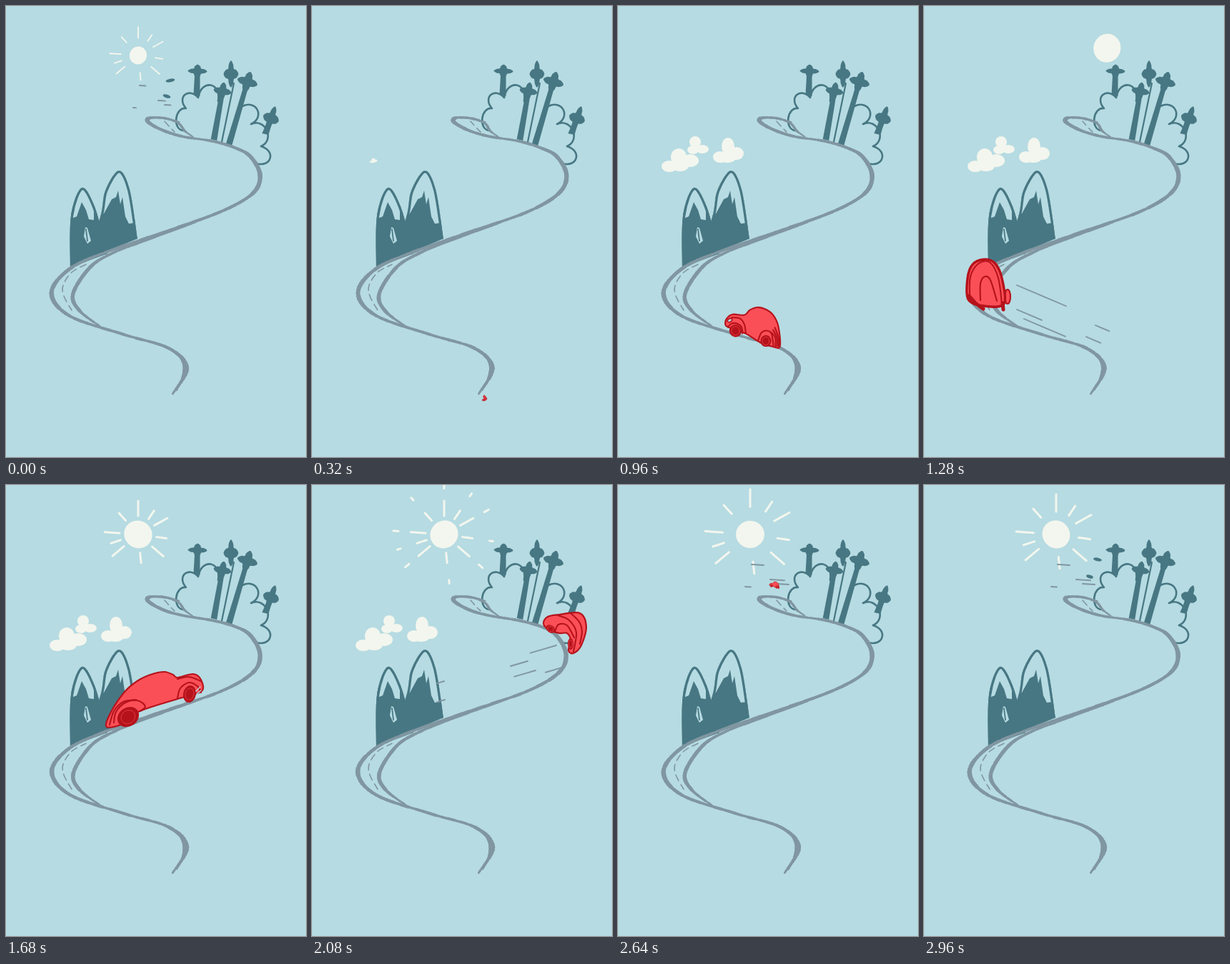
Animation, 420 px wide and 630 px high, one loop 3.04 s. Source, as an HTML page with a canvas:

```html
<!DOCTYPE html>
<html lang="en">
<head>
<meta charset="utf-8">
<title>Road trip</title>
<style>
html, body { margin: 0; width: 100%; height: 100%; overflow: hidden; background: #b6dbe2; }
canvas { display: block; }
</style>
</head>
<body>
<canvas id="stage" width="420" height="630"></canvas>
<script>
const ctx = document.getElementById('stage').getContext('2d');
const STEP = 80, COUNT = 38;
const SKY = '#b6dbe2', TEAL = '#477783', GRAY = '#8096a1', CREAM = '#f3f6ee', RED = '#fb4f57', DARK = '#b5121b';
const lerp = (a, b, k) => a + (b - a) * k;
const clamp = v => Math.max(0, Math.min(1, v));

function random(seed) {
  return () => {
    seed = (seed * 16807 + 11) % 2147483647;
    return seed / 2147483647 - 0.5;
  };
}

// smooth path through a flat list of points
function trace(p, closed) {
  const n = p.length / 2;
  const pick = k => {
    const m = closed ? (k + n) % n : Math.max(0, Math.min(n - 1, k));
    return [p[2 * m], p[2 * m + 1]];
  };
  ctx.beginPath();
  ctx.moveTo(p[0], p[1]);
  for (let k = 0; k < (closed ? n : n - 1); k++) {
    const [a, b, c, d] = [pick(k - 1), pick(k), pick(k + 1), pick(k + 2)];
    ctx.bezierCurveTo(b[0] + (c[0] - a[0]) / 6, b[1] + (c[1] - a[1]) / 6,
      c[0] - (d[0] - b[0]) / 6, c[1] - (d[1] - b[1]) / 6, c[0], c[1]);
  }
  if (closed) ctx.closePath();
}

function fill(color) {
  ctx.fillStyle = color;
  ctx.fill();
}

function stroke(color, width) {
  ctx.strokeStyle = color;
  ctx.lineWidth = width;
  ctx.stroke();
}

function line(color, width, p, closed) {
  trace(p, closed);
  stroke(color, width);
}

function poly(color, p) {
  ctx.beginPath();
  for (let n = 0; n < p.length; n += 2) ctx.lineTo(p[n], p[n + 1]);
  fill(color);
}

function oval(x, y, rx, ry = rx, turn = 0) {
  ctx.beginPath();
  ctx.ellipse(x, y, rx, ry, turn, 0, 7);
}

// brush stroke, heavier where the path runs up and down
function brush(p, size, rnd) {
  const q = p.map(v => v + rnd() * 0.9), n = q.length / 2;
  const spline = (k, m, t) => {
    const [a, b, c, d] = [-1, 0, 1, 2].map(o => q[2 * Math.max(0, Math.min(n - 1, k + o)) + m]);
    return b + 0.5 * t * (c - a + t * (2 * a - 5 * b + 4 * c - d + t * (3 * (b - c) + d - a)));
  };
  let x = q[0], y = q[1];
  for (let s = 1; s <= 8 * (n - 1); s++) {
    const k = Math.floor((s - 1) / 8), t = s / 8 - k;
    const u = spline(k, 0, t), v = spline(k, 1, t);
    const steep = Math.abs(v - y) / Math.hypot(u - x, v - y);
    const taper = Math.min(1, 0.5 + s / 16, 0.5 + (8 * (n - 1) - s) / 16);
    ctx.beginPath();
    ctx.moveTo(x, y);
    ctx.lineTo(u, v);
    stroke(GRAY, size * taper * (2.9 + 3.2 * steep + rnd()));
    [x, y] = [u, v];
  }
}

const OUTER = [
  243, 162, 222, 157, 203, 156, 198, 160, 206, 167, 225, 176, 250, 183, 290, 189, 320, 198, 342, 210, 356, 236,
  345, 262, 300, 288, 220, 316, 140, 344, 88, 368, 64, 401, 90, 433, 165, 459, 228, 478, 253, 506, 233, 542
];
const INNER = [265, 302, 190, 329, 150, 345, 118, 365, 94, 402, 103, 426, 132, 448];
const SPUR = [231, 480, 242, 488, 249, 503, 247, 521, 239, 537];
const FAR = [232, 160, 243, 165, 250, 175, 262, 183];

function road(i) {
  const kind = i > 35 ? 0 : Math.floor((i - (i > 27 ? 2 : 0)) / 2) % 3;
  const rnd = random(4211 + kind * 977);
  brush(OUTER, 1, rnd);
  brush(INNER, 0.9, rnd);
  brush(SPUR, 0.5, rnd);
  brush(FAR, 0.6, rnd);
  ctx.setLineDash([9, 6]);
  ctx.lineDashOffset = kind;
  line(GRAY, 1.6, [112, 361, 92, 372, 80, 390, 81, 405, 92, 425]);
  line(GRAY, 1.6, [222, 161, 230, 170, 236, 176]);
  ctx.setLineDash([]);
}

// a hill with snow above a jagged edge
function peak(outline, edge) {
  ctx.save();
  trace(outline);
  fill(TEAL);
  ctx.clip();
  poly(SKY, [edge[0], 220, ...edge, edge[edge.length - 2], 220]);
  line(TEAL, 6.5, outline);
  ctx.restore();
}

function mountains() {
  peak([90, 365, 91, 293, 106, 254, 124, 280, 142, 346], [94, 296, 99, 294, 106, 274, 112, 285, 116, 298, 123, 299]);
  peak([110, 356, 132, 295, 139, 258, 158, 230, 173, 256, 184, 325],
    [130, 293, 137, 290, 148, 270, 154, 267, 157, 258, 160, 277, 163, 267, 167, 294, 172, 304, 180, 303]);
  poly(SKY, [111, 309, 109, 322, 114, 332, 119, 328, 114, 310]);
  line(TEAL, 1.8, [112, 312, 114, 328]);
}

// outward bumps between points [x, y, bulge of the bump that ends here]
function scallop(points) {
  ctx.beginPath();
  ctx.moveTo(points[0][0], points[0][1]);
  for (let k = 1; k < points.length; k++) {
    const [x, y] = points[k - 1], [u, v, bulge] = points[k];
    const nx = (v - y) * bulge, ny = (x - u) * bulge;
    ctx.bezierCurveTo(x + nx, y + ny, u + nx, v + ny, u, v);
  }
  stroke(TEAL, 2.6);
}

// trunk from foot to top and a four-lobed crown
function tree(x, y, u, v, width, rx, ry) {
  const half = width / 2, lean = Math.atan2(u - x, y - v);
  if (width) poly(TEAL, [x - half, y - 1, x + half, y + 1, u + half * 0.8, v, u - half * 0.8, v]);
  const p = [];
  for (let a = 0; a < 6.28; a += Math.PI / 8) {
    const r = 0.8 + 0.24 * Math.cos(4 * a);
    const s = Math.cos(a) * r * rx, t = Math.sin(a) * r * ry;
    p.push(u + s * Math.cos(lean) - t * Math.sin(lean), v + s * Math.sin(lean) + t * Math.cos(lean));
  }
  trace(p, true);
  fill(TEAL);
}

function grove() {
  scallop([[248, 174], [252, 143, 0.5], [269, 128, 0.9], [297, 133, 0.95]]);
  scallop([[331, 140], [343, 165, 0.8], [357, 196, 0.65], [350, 220, 0.9]]);
  line(TEAL, 2.2, [302, 190, 319, 108]);
  tree(267, 125, 268, 91, 9, 13, 9);
  tree(291, 187, 303, 119, 8.5, 12, 12);
  tree(315, 110, 315, 95, 0, 10, 18);
  tree(312, 194, 338, 106, 8.5, 14, 14);
  tree(363, 179, 371, 157, 9, 11, 17);
}

const RAYS = [-90, -56, -29, 8, 41, 84, 140, 162, 184, 228];

// one burst of rays: the tips ease out, the roots catch up
function burst(age) {
  if (age > 6) return;
  const near = 21 + 4.5 * age + 0.45 * age * age;
  const tip = 71 - 36 * (1 - age / 6) ** 2;
  RAYS.forEach((deg, n) => {
    const a = deg * Math.PI / 180, far = lerp(near, tip, n % 2 ? 0.7 : 1.04);
    line(CREAM, 3, [Math.cos(a) * near, Math.sin(a) * near, Math.cos(a) * far, Math.sin(a) * far]);
  });
}

function sun(j) {
  const size = 1 - 0.37 * Math.max(0, j - 37);
  if (j < 14 || size <= 0) return;
  const k = clamp((j - 14) / 6), left = 1 - k;
  ctx.save();
  ctx.translate(lerp(292, 185, k), 69 + 19 * left * left - 84 * k * left);
  ctx.scale(size, size);
  oval(0, 0, 19, 20, j);
  fill(CREAM);
  if (j >= 20) burst((j - 20) % 5);
  if (j >= 25) burst((j - 20) % 5 + 5);
  ctx.restore();
}

const CLOUDS = [
  { x: 86, y: 216, born: 3.5, gone: 32.5, puffs: [[72, 224, 11, 8], [85, 211, 11, 12], [101, 216, 12, 9], [87, 223, 12, 8]] },
  { x: 111, y: 195, born: 4, gone: 31.7, puffs: [[108, 190, 8, 8], [118, 200, 9, 6], [105, 201, 8, 6]] },
  { x: 156, y: 205, born: 5, gone: 30.2, puffs: [[154, 196, 9, 12], [143, 211, 10, 8], [166, 206, 10, 9], [153, 212, 12, 7]] }
];

function clouds(j) {
  CLOUDS.forEach(({ x, y, born, gone, puffs }) => {
    const size = clamp((j - born) / 2.5) * clamp((gone - j) / 3);
    puffs.forEach(([px, py, rx, ry]) => {
      oval(lerp(x, px, size), lerp(y, py, size), rx * size, ry * size);
      fill(CREAM);
    });
  });
}

function body(w, p) {
  trace(p, true);
  fill(RED);
  stroke(DARK, w);
}

function wheel(w, x, y, rx, ry, turn = 0) {
  oval(x, y, rx, ry, turn);
  fill(DARK);
  oval(x, y, rx * 0.65, ry * 0.7, turn);
  stroke(RED, w * 0.3);
}

// each pose is drawn in place, around its own middle
const POSES = {
  left: { x: 291, y: 155, draw(w) {
    body(w, [222, 153, 225, 138, 238, 128, 266, 127, 278, 114, 296, 106, 316, 109, 335, 121, 350, 147, 358, 195,
      340, 197, 310, 190, 272, 171, 231, 160]);
    wheel(w, 248, 167, 15, 15);
    wheel(w, 323, 185, 13, 14);
    line(DARK, w, [229, 160, 236, 151, 250, 149, 262, 157, 265, 172]);
    line(DARK, w, [236, 136, 255, 136, 268, 150, 273, 170]);
    line(DARK, w, [304, 187, 310, 167, 322, 160, 335, 166, 342, 194]);
    for (let n = 0; n < 3; n++) line(DARK, w, [334 + n * 4, 163 - n * 6, 345 + n * 4, 175, 347 + n * 4, 195]);
    oval(232, 143, 6, 4, -0.6);
    fill(SKY);
    stroke(DARK, w * 0.8);
  } },
  right: { x: 208, y: 300, draw(w) {
    body(w, [141, 338, 146, 319, 166, 289, 185, 273, 205, 264, 222, 261, 234, 265, 240, 269, 262, 264, 273, 272,
      274, 288, 243, 298, 187, 316, 165, 333]);
    wheel(w, 171, 324, 16, 13, -0.6);
    wheel(w, 257, 292, 9, 12, 0.2);
    line(DARK, w, [151, 332, 154, 317, 167, 304, 184, 301, 195, 309, 188, 316]);
    line(DARK, w, [145, 335, 151, 316, 164, 303, 182, 300]);
    line(DARK, w, [240, 298, 244, 284, 256, 276, 268, 281, 273, 290]);
    line(DARK, w, [240, 271, 256, 268, 273, 274]);
    for (let n = 0; n < 2; n++) line(SKY, w * 0.6, [266 + n, 288 + n * 4, 272 + n, 282 + n * 5]);
  } },
  rear: { x: 88, y: 390, draw(w) {
    oval(117, 406, 4, 10);
    fill(RED);
    stroke(DARK, w);
    body(w * 1.6, [62, 410, 61, 380, 68, 361, 84, 354, 99, 359, 109, 380, 112, 416, 84, 419]);
    line(DARK, w, [64, 404, 65, 378, 76, 360, 92, 358, 104, 380, 109, 416]);
    line(DARK, w, [79, 411, 79, 388, 85, 378, 93, 383, 102, 412]);
    line(DARK, w * 2.4, [63, 405, 72, 415, 83, 423]);
    line(DARK, w * 2.4, [110, 415, 111, 424]);
  } },
  bend: { x: 355, y: 205, draw(w) {
    body(w, [324, 193, 330, 184, 346, 181, 375, 179, 384, 198, 377, 224, 366, 235, 359, 231, 362, 217, 357, 207, 346, 207, 331, 202]);
    line(DARK, w, [344, 182, 360, 189, 370, 206, 366, 233]);
    line(DARK, w, [362, 179, 374, 191, 378, 205, 375, 222]);
    line(DARK, w, [340, 205, 345, 195, 357, 196, 367, 213]);
    wheel(w, 334, 201, 7, 5, 0.6);
    wheel(w, 362, 222, 4, 8);
  } }
};

// speed, spin and growth are per step, counted from the moment mid
const LEGS = [
  { pose: 'bend', first: 4, last: 8, mid: 8, x: 269, y: 532, dx: 7, dy: -4, turn: 63, size: 0.72, grow: 0.15 },
  { pose: 'left', first: 9, last: 14, mid: 12, x: 190, y: 449, dx: -26, dy: -13, turn: 5, spin: -3, size: 0.58, grow: 0.075 },
  { pose: 'rear', first: 15, last: 17, mid: 16, dx: -4, dy: -16 },
  { pose: 'right', first: 18, last: 24, mid: 21, dx: 33, dy: -14, fade: 0.035 },
  { pose: 'bend', first: 25, last: 27, mid: 26, dx: -1, dy: -18, spin: -20 },
  { pose: 'left', first: 28, last: 33, mid: 30, dx: -24, dy: -5, fade: 0.1 }
];

function car(j) {
  const leg = LEGS.find(l => j >= l.first && j <= l.last);
  if (!leg) return;
  const pose = POSES[leg.pose], d = j - leg.mid;
  const { x = pose.x, y = pose.y, turn = 0, spin = 0, size = 1, grow = 0, fade = 0 } = leg;
  const scale = size + grow * d - fade * d * d;
  ctx.save();
  ctx.translate(x + leg.dx * d, y + leg.dy * d);
  ctx.rotate((turn + spin * d) * Math.PI / 180);
  ctx.scale(scale, scale);
  ctx.translate(-pose.x, -pose.y);
  pose.draw(Math.min(2.1 / scale, 5));
  ctx.restore();
}

// speed lines [head x, head y, length]; the tail catches up with the head
const TRAILS = [
  { first: 7, end: 10, dx: -0.8, dy: 0.6, lines: [[241, 542, 10], [245, 544, 9], [256, 551, 17]] },
  { first: 15, end: 19, dx: 0.92, dy: 0.39, lines: [[130, 390, 75], [130, 424, 38], [140, 437, 63], [227, 462, 22], [240, 446, 21]] },
  { first: 25, end: 28, dx: -0.96, dy: 0.28, lines: [[342, 224, 38], [302, 246, 25], [313, 259, 31], [350, 255, 24], [185, 274, 11], [186, 300, 12]] },
  { first: 29, end: 32, dx: 0.2, dy: 0.98, lines: [[361, 208, 23]] },
  { first: 33, end: 39, dx: 1, dy: 0.06, lines: [[187, 111, 17], [213, 132, 20], [222, 138, 17], [178, 142, 8]] }
];

function trails(j) {
  TRAILS.filter(t => j >= t.first && j < t.end).forEach(({ end, dx, dy, lines }) => {
    const k = Math.min(1, (end - j) / 2);
    lines.forEach(([x, y, len]) => line(GRAY, 1.9, [x, y, x + dx * len * k, y + dy * len * k]));
  });
}

function leaves(j) {
  if (j < 35 || j > 39) return;
  const d = j - 37;
  oval(243 - 13 * d, 104, 6 + d / 2, 2.4, 0.2 - d * 0.4);
  fill(TEAL);
  oval(232 - 7 * d, 128 - 2 * d, 5 + d / 2, 2.4, 0.3);
  fill(TEAL);
}

function paint(i) {
  const j = i < 4 ? i + COUNT : i;
  ctx.lineCap = ctx.lineJoin = 'round';
  ctx.fillStyle = SKY;
  ctx.fillRect(0, 0, 420, 630);
  sun(j);
  clouds(j);
  mountains();
  grove();
  road(i);
  trails(j);
  leaves(j);
  car(j);
}

const start = performance.now();
function tick() {
  paint(Math.floor((performance.now() - start) / STEP) % COUNT);
  requestAnimationFrame(tick);
}
tick();
</script>
</body>
</html>
```
